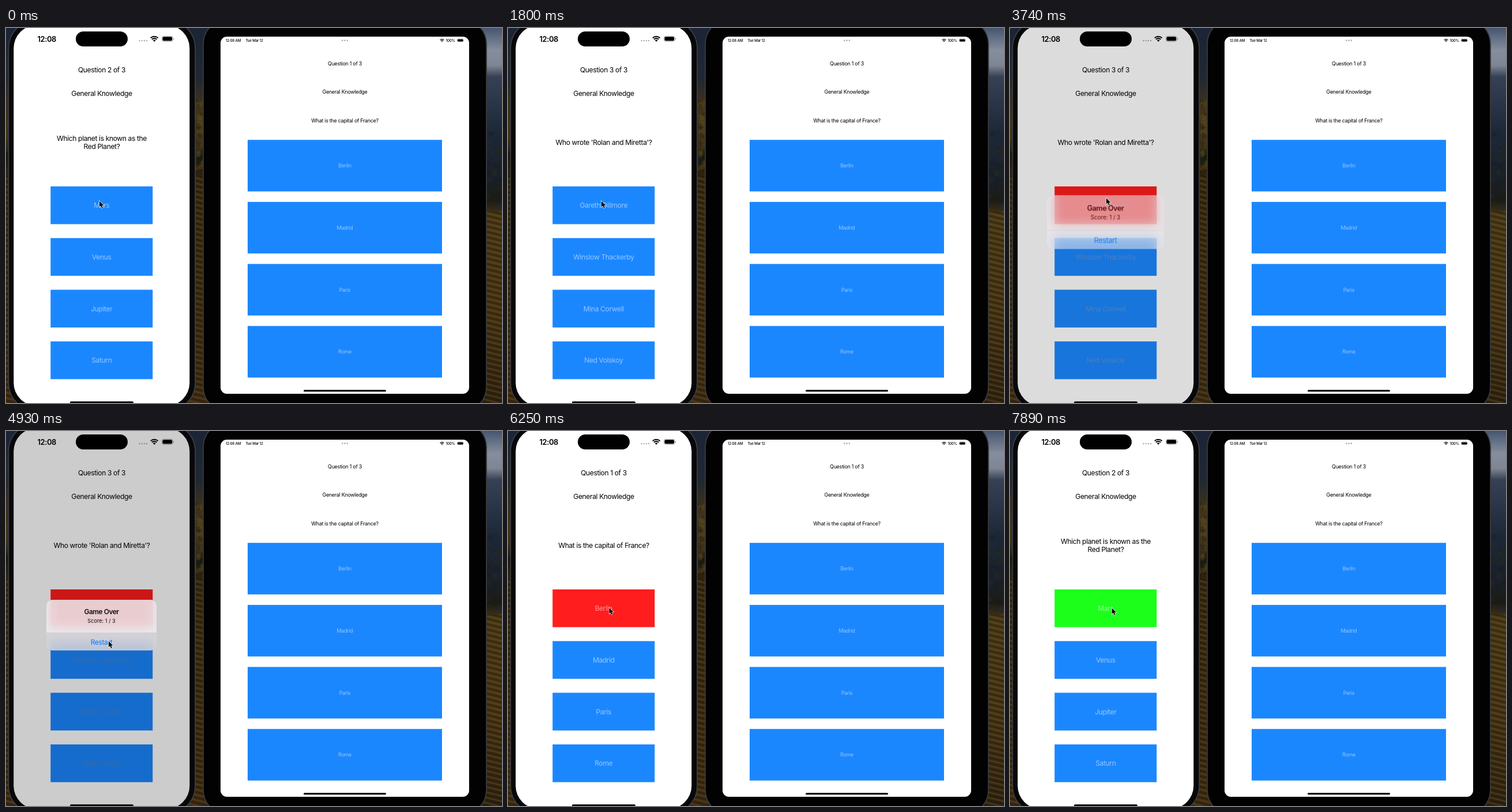
An HTML page for the animation above (8 s loop, 860x651 px).

```html
<!DOCTYPE html>
<html lang="en">
<head>
<meta charset="utf-8">
<title>Quiz on two devices</title>
<style>
  html, body { margin: 0; width: 860px; height: 651px; overflow: hidden; background: #000; }
  svg { position: absolute; left: 0; top: 0; }
  svg text, #alert { font-family: Inter, "Open Sans", sans-serif; letter-spacing: -.032em; }
  #alert {
    position: absolute; left: 70px; top: 293px; width: 191px; height: 88px;
    border-radius: 10px; overflow: hidden; text-align: center;
    background: rgba(239, 237, 241, .85); backdrop-filter: blur(8px);
  }
  #alert div { position: absolute; width: 100%; }
  .head { top: 12px; font: 600 12px/18px Inter, sans-serif; color: #111; }
  .score { top: 30px; font: 9.2px/13px Inter, sans-serif; color: #111; letter-spacing: 0; }
  #restart { top: 56.5px; height: 31.5px; font: 12.2px/32px Inter, sans-serif; color: #0a7aff; border-top: .7px solid #cfcdd1; }
</style>
</head>
<body>
<svg id="stage" width="860" height="651">
  <defs>
    <linearGradient id="mid" x2="0" y2="1">
      <stop offset="0" stop-color="#1b2436"/><stop offset=".13" stop-color="#202833"/>
      <stop offset=".2" stop-color="#3b311b"/><stop offset=".29" stop-color="#463617"/>
      <stop offset=".34" stop-color="#171a10"/><stop offset=".4" stop-color="#31250f"/>
      <stop offset="1" stop-color="#3a2811"/>
    </linearGradient>
    <linearGradient id="right" x2="0" y2="1">
      <stop offset="0" stop-color="#46566f"/><stop offset=".06" stop-color="#858e9e"/>
      <stop offset=".1" stop-color="#7e8593"/><stop offset=".13" stop-color="#364156"/>
      <stop offset=".28" stop-color="#1c2737"/><stop offset=".4" stop-color="#1a2028"/>
      <stop offset=".46" stop-color="#1c1b14"/><stop offset=".5" stop-color="#463614"/>
      <stop offset=".75" stop-color="#433112"/><stop offset="1" stop-color="#2c2010"/>
    </linearGradient>
    <pattern id="rows" width="40" height="9" patternUnits="userSpaceOnUse" patternTransform="rotate(14)">
      <path d="M0 2H40" stroke="#8a6a24" stroke-width="2.5" opacity=".3"/>
      <path d="M0 6.5H40" stroke="#1a140a" stroke-width="3" opacity=".3"/>
    </pattern>
  </defs>
  <rect width="430" height="651" fill="url(#mid)"/>
  <rect x="430" width="430" height="651" fill="url(#right)"/>
  <g id="trees"></g>
  <rect y="255" width="430" height="396" fill="url(#rows)"/>
  <rect x="430" y="318" width="430" height="333" fill="url(#rows)"/>

  <!-- phone -->
  <path d="M4 52V78M4 118V160M4 172V214M328.5 155V240" stroke="#2c2d30" stroke-width="3"/>
  <rect x="4.5" y="-14" width="323.5" height="679" rx="49" fill="#08080a" stroke="#3f4043" stroke-width="1.6"/>
  <rect x="13.3" y="-5" width="305" height="661" rx="40" fill="#fff"/>
  <g id="phone"></g>
  <rect id="dim" x="13.3" y="-5" width="305" height="661" rx="40"/>
  <rect x="121" y="6" width="90" height="26" rx="13"/>
  <rect x="111" y="648.3" width="110" height="4" rx="2"/>

  <!-- tablet -->
  <rect x="342" y="-16" width="491" height="683" rx="44" fill="#020203" stroke="#3a3b3e" stroke-width="1.8"/>
  <rect x="372" y="15" width="431" height="620" rx="11" fill="#fff"/>
  <rect x="516" y="628.3" width="143" height="3" rx="1.5"/>
  <g id="tablet"></g>
</svg>

<div id="alert">
  <div class="head">Game Over</div>
  <div class="score">Score: 1 / 3</div>
  <div id="restart">Restart</div>
</div>

<svg id="cursor" width="12" height="18" viewBox="-1.5 -1.5 13 19.5">
  <path d="M0 0V11.2L2.6 8.8L4.4 13L6.4 12.1L4.6 8.1H8.2Z" stroke="#fff" stroke-width="1.3" paint-order="stroke"/>
</svg>

<script>
const $ = id => document.getElementById(id);
const BLUE = '#1b87ff', GREEN = '#1cff1b', RED = '#ff1d1d';

function add(parent, tag, attrs, text = '') {
  const el = document.createElementNS('http://www.w3.org/2000/svg', tag);
  for (const k in attrs) el.setAttribute(k, attrs[k]);
  el.textContent = text;
  return parent.appendChild(el);
}

// y is the middle of the capitals
const label = (parent, x, y, size, text, extra) =>
  add(parent, 'text', { x, y: y + size * .36, 'font-size': size, 'text-anchor': 'middle', ...extra }, text);

function buttons(parent, x, y, w, h, pitch, size, names) {
  return names.map((name, i) => ({
    box: add(parent, 'rect', { x, y: y + i * pitch, width: w, height: h, fill: BLUE }),
    title: label(parent, x + w / 2, y + i * pitch + h / 2 + .2, size, name, { fill: 'rgba(255,255,255,.53)' })
  }));
}

function wifi(parent, x, y, s) {
  const g = add(parent, 'g', { transform: `translate(${x} ${y}) scale(${s})` });
  const arc = r => `M${-.7 * r} ${-.7 * r}A${r} ${r} 0 0 1 ${.7 * r} ${-.7 * r}`;
  add(g, 'path', { d: arc(9.2) + arc(5.9), fill: 'none', stroke: '#000', 'stroke-width': 2 });
  add(g, 'path', { d: arc(3.4) + 'L0 0Z' });
}

function battery(parent, x, y, s) {
  const g = add(parent, 'g', { transform: `translate(${x} ${y}) scale(${s})` });
  add(g, 'rect', { x: .4, y: .4, width: 18.8, height: 9.2, rx: 3, fill: 'none', stroke: '#999', 'stroke-width': .8 });
  add(g, 'rect', { x: 1.5, y: 1.5, width: 16.6, height: 7, rx: 2 });
  add(g, 'rect', { x: 20, y: 3.4, width: 1.2, height: 3.2, rx: .6, fill: '#999' });
}

const dots = (parent, x, y, n, gap, r) => {
  for (let i = 0; i < n; i++) add(parent, 'circle', { cx: x + i * gap, cy: y, r, fill: '#aaa' });
};

// Autumn foliage in the visible strips
let seed = 7;
const rnd = () => (seed = seed * 16807 % 2147483647) / 2147483647;
for (let i = 0; i < 90; i++) {
  const far = i % 2, y = far ? 180 + rnd() * 140 : 125 + rnd() * 125;
  add($('trees'), 'circle', {
    cx: far ? 832 + rnd() * 28 : 326 + rnd() * 18, cy: y, r: 2 + rnd() * 4, opacity: .35,
    fill: far ? ['#151c26', '#222a34', '#2a2719'][i % 3] : ['#5a4218', '#1d1f12', '#644c1e'][i % 3]
  });
}

const quiz = [
  { ask: ['What is the capital of France?'], names: ['Berlin', 'Madrid', 'Paris', 'Rome'] },
  { ask: ['Which planet is known as the', 'Red Planet?'], names: ['Mars', 'Venus', 'Jupiter', 'Saturn'] },
  { ask: ["Who wrote 'Rolan and Miretta'?"],
    names: ['Gareth Dillmore', 'Winslow Thackerby', 'Mina Corwell', 'Ned Volskoy'] }
];

const phone = $('phone'), tablet = $('tablet'), SIZE = 12.1, SMALL = 8.95;

label(phone, 70.7, 19, 13, '12:08', { 'font-weight': 600 });
dots(phone, 231.5, 22, 4, 4.2, 1.2);
wifi(phone, 257.2, 23.8, 1);
battery(phone, 270, 13.8, 1);
const count = label(phone, 166, 72.7, SIZE);
label(phone, 166, 113.2, SIZE, 'General Knowledge');
const asks = [0, 1].map(() => label(phone, 166, 0, SIZE));
const answers = buttons(phone, 77.3, 275, 177, 65.5, 89.7, SIZE, quiz[0].names);

const tiny = { 'letter-spacing': 0, 'font-weight': 500 };
label(tablet, 394, 21.5, 6.2, '12:08 AM', tiny);
label(tablet, 430.5, 21.5, 6.2, 'Tue Mar 12', tiny);
dots(tablet, 583.3, 21.6, 3, 4.3, 1.3);
wifi(tablet, 756, 24.2, .53);
label(tablet, 770.5, 21.5, 6.2, '100%', tiny);
battery(tablet, 782, 18.6, .58);
['Question 1 of 3', 'General Knowledge', quiz[0].ask[0]].forEach((s, i) =>
  label(tablet, 587.5, 61.7 + i * 49.4, SMALL, s));
buttons(tablet, 419, 194.2, 337, 89.5, 107.7, SMALL, quiz[0].names);

// Tracks hold each value until the next time
const question = [[0, 1], [1650, 2], [5370, 0], [7140, 1]];
const colour = [[0, BLUE], [600, GREEN], [1650, BLUE], [2550, RED], [5370, BLUE], [6100, RED], [7140, BLUE], [7740, GREEN]];
const shade = [[0, 0], [3740, .69], [3890, .96], [4030, 1], [5080, .35], [5230, .06], [5370, 0]];
const pointer = [
  [0, 162, 300.5], [3300, 164, 299], [3440, 166, 296.5], [3590, 167, 295.5],
  [3890, 168.5, 303], [4030, 172, 325], [4180, 177, 352], [4330, 178, 365],
  [4480, 178.5, 364.5], [4630, 178, 365], [5080, 178, 349], [5230, 178, 331],
  [5370, 177, 316], [5520, 176, 308], [5660, 175.5, 307], [6690, 176.5, 303],
  [6840, 177, 303.5], [7440, 177, 306], [7590, 176.7, 307.5]
];
const presses = [600, 2550, 6100, 7740], swaps = [1650, 5370, 7140];

const at = (track, t) => track.findLast(k => k[0] <= t);
const within = (starts, t) => starts.some(s => t >= s && t < s + 150);

function draw(t) {
  const n = at(question, t)[1], q = quiz[n], p = at(shade, t)[1];
  count.textContent = `Question ${n + 1} of 3`;
  asks.forEach((el, i) => {
    el.textContent = q.ask[i] || '';
    el.setAttribute('y', 198.3 + SIZE * .36 + (i * 2 - q.ask.length + 1) * 7.1);
  });

  const grey = 255 - 125 * p, swap = within(swaps, t), press = within(presses, t);
  answers.forEach(({ box, title }, i) => {
    box.setAttribute('fill', i ? BLUE : at(colour, t)[1]);
    title.textContent = q.names[i];
    title.setAttribute('fill', `rgba(${grey},${grey},${grey},${.53 - .18 * p})`);
    title.setAttribute('opacity', swap || press && !i ? .45 : 1);
  });

  $('dim').setAttribute('opacity', .2 * p);
  const box = $('alert').style;
  box.opacity = p ** 1.2;
  box.visibility = p ? 'visible' : 'hidden';
  box.transform = `scale(${t < 4500 ? 1.2 - .2 * p : 1})`;
  $('restart').style.background = t >= 4930 && t < 5080 ? 'rgba(0,0,0,.09)' : 'none';

  const [, x, y] = at(pointer, t);
  $('cursor').style.transform = `translate(${x - 1.4}px, ${y - 1.4}px)`;
}

const start = performance.now();
function tick() {
  draw((performance.now() - start) % 8000);
  requestAnimationFrame(tick);
}
tick();
</script>
</body>
</html>
```
